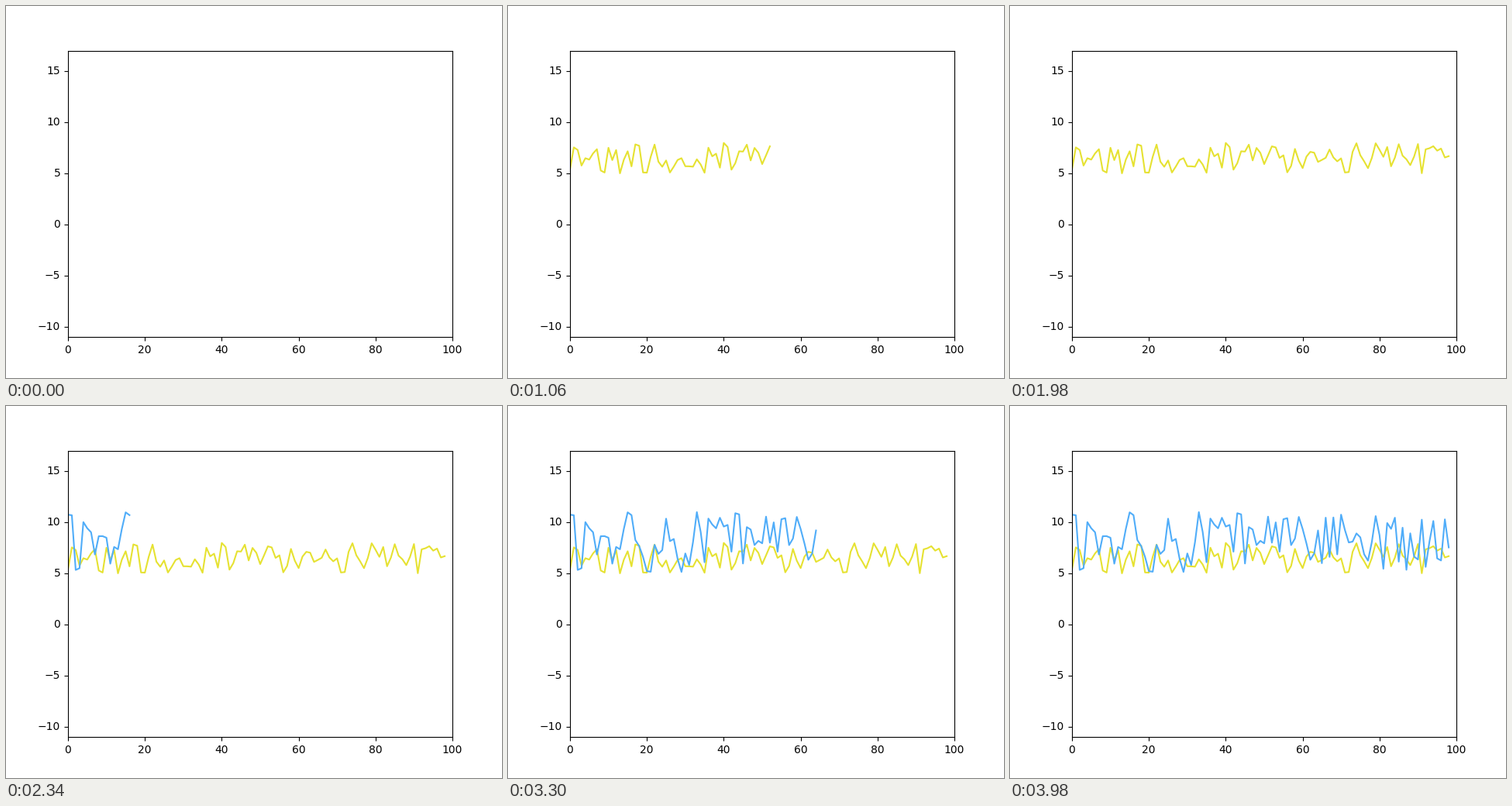
Recreate the animation shown at these times as a matplotlib script. Size 640 by 480 pixels, loop 4000 ms.

```python
import random

import matplotlib.pyplot as plt
from matplotlib.animation import FuncAnimation

STEPS = 100  # animation steps per line

plt.rcParams.update({"text.kerning_factor": 6, "ytick.alignment": "center"})


def noise(seed, low, high):
    rng = random.Random(seed)
    return [rng.uniform(low, high) for _ in range(STEPS - 1)]


fig, ax = plt.subplots(figsize=(6.4, 4.8), dpi=100)
ax.set_xlim(0, 100)
ax.set_ylim(-11, 17)

series = [noise(1, 5, 8), noise(2, 5, 11)]
lines = [ax.plot([], [], color=color, lw=1.5)[0]
         for color in ("#e6e232", "#50adf9")]


def update(step):
    """Reveal one point per step, the second line after the first."""
    for i, (line, values) in enumerate(zip(lines, series)):
        shown = values[:max(step - i * STEPS, 0)]
        line.set_data(range(len(shown)), shown)
    return lines


anim = FuncAnimation(fig, update, frames=2 * STEPS, interval=20,
                     repeat=True, repeat_delay=0, blit=False)
plt.show()
```
